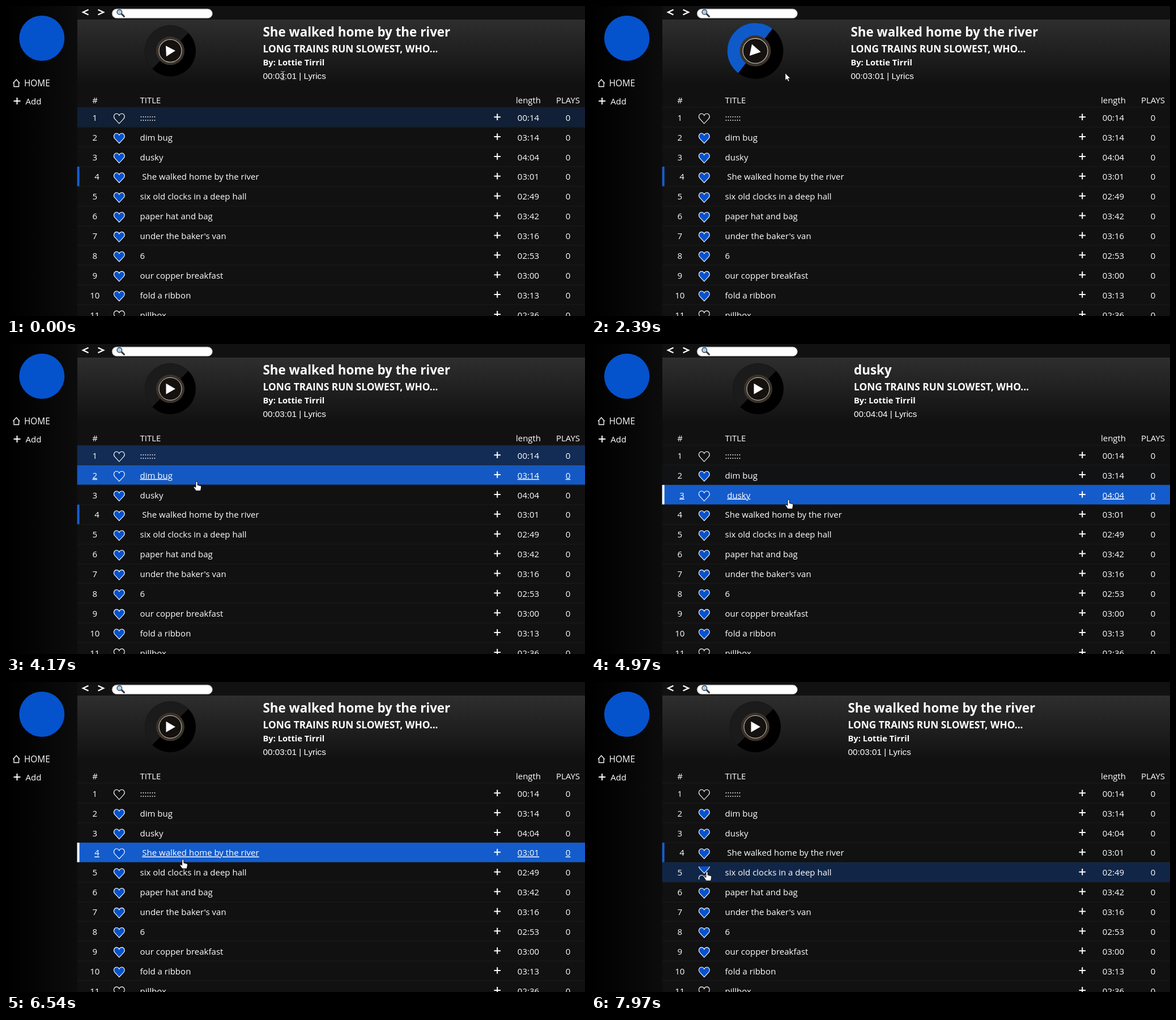
An HTML page that plays this animation: 1022 by 548 pixels, repeating every 8000 ms.

```html
<!DOCTYPE html>
<html lang="en">
<head>
<meta charset="utf-8">
<title>Album page</title>
<style>
html, body { margin: 0; width: 100%; height: 100%; overflow: hidden; background: #111; }
svg { display: block; width: 1022px; height: 548px; font: 15px "Open Sans", "Noto Sans", sans-serif; fill: #fff; }
.mid { text-anchor: middle; }
.bold { font-weight: 700; }
.line { fill: none; stroke: #fff; }
.over .link { text-decoration: underline; text-decoration-thickness: 1px; text-underline-offset: 2px; }
</style>
</head>
<body>
<svg viewBox="0 0 1022 548">
  <defs>
    <linearGradient id="side"><stop stop-color="#000"/><stop offset="1" stop-color="#0c0c0c"/></linearGradient>
    <linearGradient id="head" x2="0" y2="1"><stop stop-color="#2e2e2e"/><stop offset="1" stop-color="#111"/></linearGradient>
    <clipPath id="slot"><rect x="186" y="326" width="28" height="23"/></clipPath>
  </defs>
  <rect width="1022" height="548" fill="#111"/>
  <rect width="126" height="548" fill="url(#side)"/>
  <rect x="126" y="24" width="896" height="114" fill="url(#head)"/>

  <circle cx="63.3" cy="57" r="40" fill="#0552cd"/>
  <path class="line" stroke-width="1.3" d="M12.5 136.5L18.3 130L24 136.5M14 135.5V142.5H22.6V135.5"/>
  <text x="32" y="142.3" font-size="15.4">HOME</text>
  <path class="line" stroke-width="2" d="M13.5 168H25.5M19.5 162V174"/>
  <text x="34.5" y="174.3">Add</text>

  <path class="line" stroke-width="2.4" d="M145.5 6.5L136 11L145.5 15.5M162.5 6.5L172 11L162.5 15.5"/>
  <rect x="187" y="5" width="177.5" height="16.8" rx="8.4" stroke="#666"/>
  <path fill="none" stroke="#3b3036" stroke-width="3" stroke-linecap="round" d="M204 14L208.5 18.5"/>
  <circle cx="200.3" cy="10.8" r="4.3" fill="#a9d2f0" stroke="#3f4a58" stroke-width="1.5"/>

  <g id="disc">
    <circle r="45" fill="#000"/>
    <path id="half" d="M-45 0A45 45 0 0 1 45 0Z"/>
    <circle r="25" fill="#3a332c"/>
    <circle r="20" fill="#14110f" stroke="#d6cbbb"/>
    <path id="play" d="M-7.5 -9.5V9.5L9 0Z"/>
  </g>
  <g id="info">
    <text id="song" class="bold" y="53.5" font-size="22.4"></text>
    <text class="bold" y="82" font-size="17.3">LONG TRAINS RUN SLOWEST, WHO...</text>
    <text class="bold" y="105" font-size="14.7">By: Lottie Tirril</text>
    <text id="time" y="129" font-size="15.3" font-family="Liberation Sans, sans-serif"></text>
  </g>

  <text class="mid" x="157" y="171.8">#</text>
  <text x="236.5" y="171.8">TITLE</text>
  <text class="mid" x="922" y="171.8">length</text>
  <text class="mid" x="992" y="171.8">PLAYS</text>
  <g id="rows"></g>

  <g id="cursor">
    <path id="ibeam" fill="none" stroke="#aaa" stroke-width="1.2" d="M-3.5 -7.5Q0 -7.5 0 -5.5Q0 -7.5 3.5 -7.5M0 -5.5V5.5M-3.5 7.5Q0 7.5 0 5.5Q0 7.5 3.5 7.5"/>
    <path id="arrow" stroke="#000" stroke-width=".8" d="M0 0V13L3 10.4L5.2 15L7.3 14L5.2 9.6H9.2Z"/>
    <path id="hand" stroke="#000" stroke-width=".9" d="M-1.6 1Q0 -1 1.6 1V6.3L6.6 7.4Q8.6 8 8.2 10L7 16.5H-1L-5.4 10.5Q-5 8.2 -1.6 10.4Z"/>
  </g>
</svg>
<script>
const LOOP = 8000, TOP = 179.4, PITCH = 34.87, HEART_X = 199.8;
const HEAD = "head", NONE = "none";
const $ = id => document.getElementById(id);

const songs = `:::::::|00:14
dim bug|03:14
dusky|04:04
She walked home by the river|03:01
six old clocks in a deep hall|02:49
paper hat and bag|03:42
under the baker's van|03:16
6|02:53
our copper breakfast|03:00
fold a ribbon|03:13
pillbox|02:36`.split("\n").map(s => s.split("|"));

// What the pointer is over, from each time until the next
const visits = [
  [-900, 0], [-300, NONE], [0, HEAD], [1140, NONE], [1910, HEAD], [2900, NONE],
  [3370, 0], [3950, 1], [4440, 2], [5560, 3], [6990, 4], [7720, NONE]
];

// Pointer stops: time, x, y
const stops = [
  [0, 489, 123], [600, 344, 108], [1130, 344, 108], [1470, 342.5, 119.5], [2880, 343, 118],
  [3320, 333.5, 177], [4170, 336.5, 243], [5660, 359, 302.5], [6240, 357, 306],
  [6980, 247, 324.5], [7710, 205, 335], [LOOP, 204.5, 335]
];

const clamp = v => Math.min(1, Math.max(0, v));

// The CSS "ease" curve: halve the interval until x(s) fits
function ease(x) {
  let lo = 0, hi = 1;
  for (let i = 0; i < 22; i++) {
    const s = (lo + hi) / 2;
    if (.75 * s * (1 - s) + s ** 3 < clamp(x)) lo = s; else hi = s;
  }
  return .3 * lo * (1 - lo) ** 2 + 3 * lo * lo * (1 - lo) + lo ** 3;
}

function hover(zone, t, rise, fall) {
  let level = 0, over = false;
  visits.forEach(([enter, at], i) => {
    if (at !== zone || t < enter) return;
    const leave = visits[i + 1][0];
    over = t < leave;
    level = ease((Math.min(t, leave) - enter) / rise) * (1 - ease((t - leave) / fall));
  });
  return { level, over };
}

function pointer(t) {
  const i = stops.findIndex(s => s[0] > t);
  const [t0, x0, y0] = stops[i - 1], [t1, x1, y1] = stops[i], k = (t - t0) / (t1 - t0);
  return [x0 + (x1 - x0) * k, y0 + (y1 - y0) * k];
}

function set(el, attrs) {
  for (const k in attrs) el.setAttribute(k, attrs[k]);
  return el;
}

function add(parent, tag, attrs, text = "") {
  const el = set(document.createElementNS("http://www.w3.org/2000/svg", tag), attrs);
  el.textContent = text;
  return parent.appendChild(el);
}

const move = (x, y) => `translate(${x} ${y})`;

function heart(parent, y, liked) {
  return add(parent, "path", {
    d: "M0 9.2L-8 .6C-11 -3 -8.8 -8.4 -4.8 -8.4C-2.3 -8.4 -.8 -7.1 0 -5.1C.8 -7.1 2.3 -8.4 4.8 -8.4C8.8 -8.4 11 -3 8 .6Z",
    class: "line", "stroke-width": 1.1, transform: move(HEART_X, y),
    style: `fill:${liked ? "#0552cd" : "none"}`
  });
}

const rows = songs.map(([name, length], i) => {
  const g = add($("rows"), "g", {}), y = TOP + i * PITCH, mid = y + 17.8, base = mid + 5.6;
  add(g, "rect", { x: 126, y: Math.round(y) - .5, width: 896, height: 1, fill: "#1d1d1d" });
  const bg = add(g, "rect", { x: 125.6, y, width: 897, height: PITCH, fill: "rgb(20,92,203)" });
  const bar = add(g, "rect", { x: 125.6, y, width: 4, height: PITCH });
  const num = add(g, "text", { class: "mid link", y: base }, i + 1);
  const slot = add(g, "g", {});
  const like = heart(slot, mid + 1.4, i > 0 && i < 10);
  const title = add(g, "text", { class: "link", y: base }, name);
  add(g, "path", { class: "line", "stroke-width": 2, d: `M861.5 ${mid - 1}h11.5M867.2 ${mid - 6.8}v11.5` });
  add(g, "text", { class: "mid link", x: 922, y: base }, length);
  add(g, "text", { class: "mid link", x: 992, y: base }, "0");
  return { g, bg, bar, num, slot, like, title, heartY: mid + 1.4 };
});

// The clicked heart slides up while an empty one follows it
const clicked = rows[4];
set(clicked.slot, { "clip-path": "url(#slot)" });
const empty = heart(clicked.slot, 0, false);

function drawHeader(t, active) {
  const p = hover(HEAD, t, 590, 620).level, shift = active === 2 ? 1 : 0;
  const mix = (a, b) => Math.round(a + (b - a) * p);
  set($("disc"), { transform: `${move(290 + 5 * shift, 79.3)} scale(${1 + .1 * p})` });
  set($("half"), {
    transform: `rotate(${-45 + 360 * p})`,
    fill: `rgb(${mix(27, 15)},${mix(27, 91)},${mix(27, 205)})`
  });
  set($("play"), { transform: `rotate(${-720 * p ** .774})` });
  set($("info"), { transform: move(453.5 + 10.5 * shift + 5 * p, 0) });
  $("song").textContent = songs[active][0];
  $("time").textContent = `00:${songs[active][1]} | Lyrics`;
}

function drawRow(r, i, t, active) {
  const { level, over } = hover(i, t, 300, 600), on = i === active;
  set(r.g, { class: over ? "over" : "" });
  set(r.bg, { opacity: on && !over ? 0 : level });
  set(r.bar, { fill: over ? "#fff" : "#155fd4", opacity: on ? 1 : 0 });
  set(r.num, { x: on ? 160.5 : 156.8 });
  set(r.title, { x: on ? 240.3 : 236.5 });
}

function draw(t) {
  const active = t >= 4850 && t < 6240 ? 2 : 3;
  drawHeader(t, active);
  rows.forEach((r, i) => drawRow(r, i, t, active));

  const y = clicked.heartY - 21 * ease((t - 7840) / 500);
  set(clicked.like, { transform: move(HEART_X, y) });
  set(empty, { transform: move(HEART_X, y + 21), opacity: t > 7840 ? 1 : 0 });

  const [px, py] = pointer(t);
  const kind = t >= 3370 ? "hand" : px > 452 ? "ibeam" : "arrow";
  set($("cursor"), { transform: move(px, py) });
  for (const el of $("cursor").children) set(el, { visibility: el.id === kind ? "visible" : "hidden" });
}

const start = performance.now();
function tick() {
  draw((performance.now() - start) % LOOP);
  requestAnimationFrame(tick);
}
tick();
</script>
</body>
</html>
```
